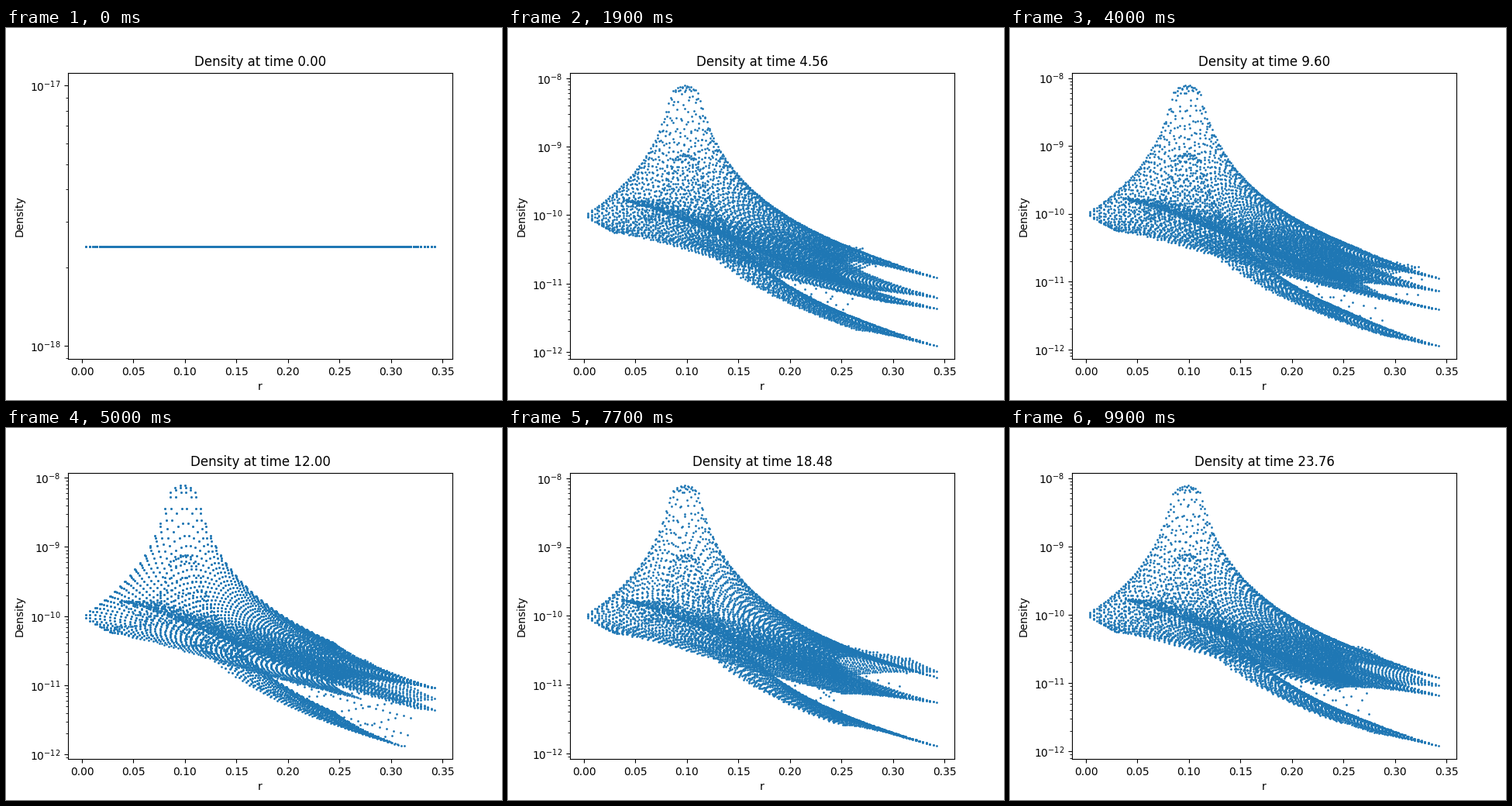
A matplotlib script that plays this animation: 640 px wide and 480 px high, repeating every 10000 ms.

```python
import numpy as np
import matplotlib.pyplot as plt
from matplotlib.animation import FuncAnimation

FRAMES, STEP = 100, 0.24
PERIOD = 24 / 7
CELLS, CELL = 100, 0.0048975
ORBIT = 20 * CELL

# cell centres of the grid
axis = (np.arange(CELLS) - (CELLS - 1) / 2) * CELL
X, Y = (a.ravel() for a in np.meshgrid(axis, axis))
R = np.hypot(X, Y)
PHI = np.arctan2(Y, X)


def wind(d, scale=1.0):
    """Spherical wind with a smooth launching core."""
    core = 7.8e-9 * (1 - 1300 * d**2)
    free = 1.1e-12 * np.exp(-1.45 * d) / np.maximum(d, 1e-3)**2
    return scale * np.where(d < 0.0137, core, free)


def smooth(x):
    x = np.clip(x, 0, 1)
    return x * x * (3 - 2 * x)


def rotated(phi, tilt):
    a = phi - tilt * R / 0.34
    return R * np.cos(a), R * np.sin(a)


def density(t):
    """Two orbiting stars whose winds collide in a bowed shell."""
    if t == 0:
        return np.full_like(R, 2.404e-18)
    theta = 2 * np.pi * t / PERIOD
    sx, sy = ORBIT * np.cos(theta), ORBIT * np.sin(theta)
    strong = np.log(wind(np.hypot(X + sx, Y + sy)))
    weak = np.log(wind(np.hypot(X - sx, Y - sy), 0.1))

    # signed distances past the outer and the inner shock;
    # the trailing side of the outer one is bent more
    w, y = rotated(PHI - theta, 0.16)
    outer = w - (0.034 + np.where(y < 0, 0.9, 0.1) * y**2)
    w, y = rotated(PHI - theta, 0.03)
    inner = w - (0.02 + np.hypot(0.035, y / 0.88))

    depth = np.clip(outer / np.maximum(outer - inner, 1e-4), 0, 1)
    shell = (1 - depth) * strong + depth * weak + np.log(4)
    enter = smooth(outer / 0.009 + 0.5)
    leave = smooth(inner / 0.018 + 0.5)
    rho = strong + enter * (shell - strong)
    return np.exp(rho + leave * (weak - rho))


fig, ax = plt.subplots(figsize=(6.4, 4.8), dpi=100)


def draw(i):
    t = i * STEP
    ax.clear()
    ax.plot(R, density(t), "o", ms=1)
    ax.set_yscale("log")
    ax.set_xlabel("r")
    ax.set_ylabel("Density")
    ax.set_title(f"Density at time {t:.2f}")
    return ax.lines


anim = FuncAnimation(fig, draw, frames=FRAMES, interval=100, repeat=True)
plt.show()
```
